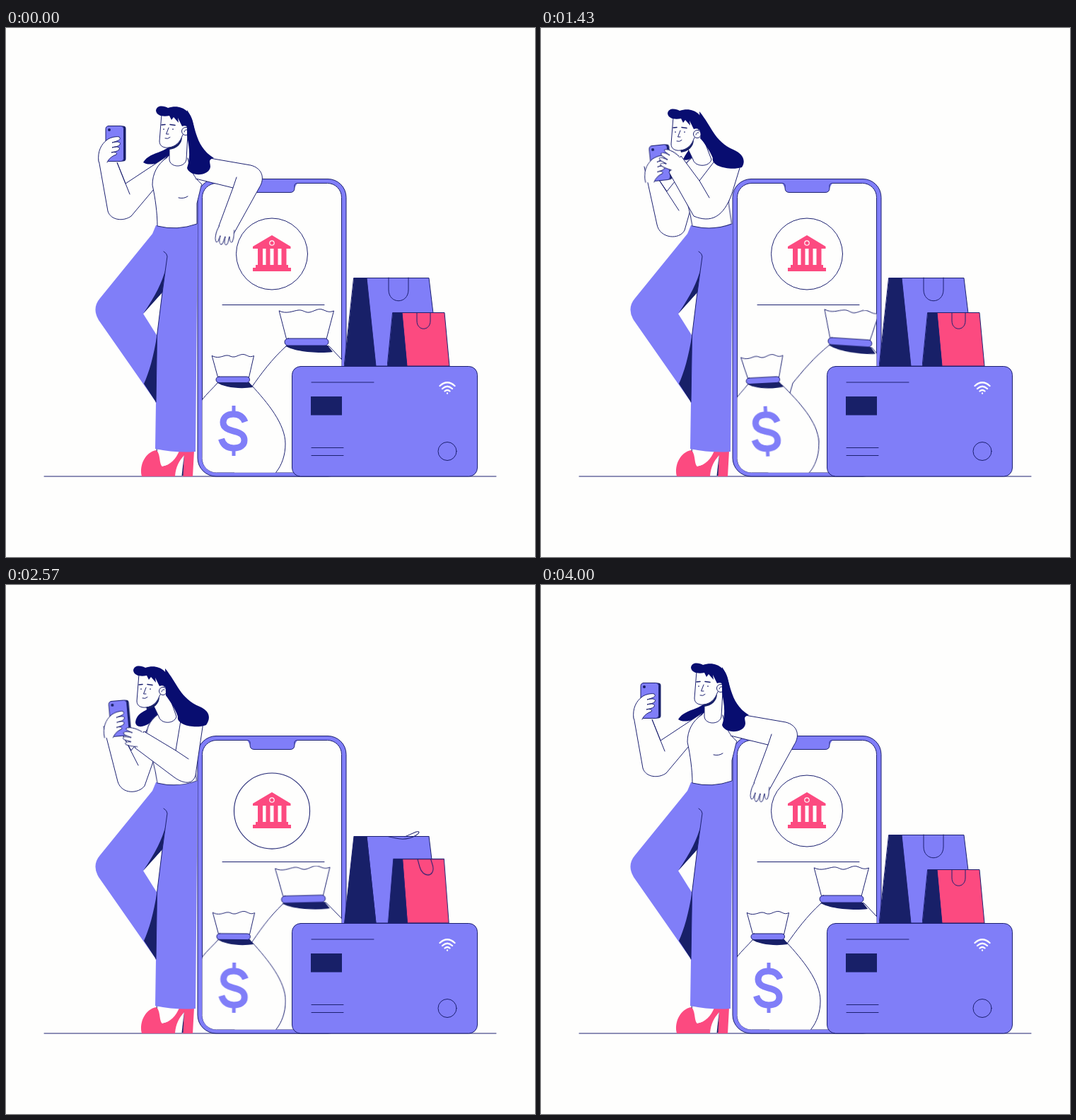
An HTML page without scripts for the animation above (4.03 s loop, 748 by 748 pixels).

```html
<!DOCTYPE html>
<html lang="en">
<head>
<meta charset="utf-8">
<title>Mobile banking</title>
<style>
html, body { margin: 0; height: 100%; overflow: hidden; background: #fefefd; }
svg { display: block; width: 100vw; height: 100vh; stroke-linejoin: round; stroke-linecap: round; }

.line { fill: none; stroke: #1c2170; }
.white { fill: #fefefd; stroke: #1c2170; }
.purple { fill: #807ef8; stroke: #1c2170; }
.plain { fill: #807ef8; }
.pink { fill: #fc4a80; }
.edge { stroke: #1c2170; }
.shade { fill: #182068; }
.hair { fill: #080d70; }

.move { animation: 4.03s cubic-bezier(.35, .15, .6, .9) infinite; }

/* Woman */
#head { animation-name: head; }
@keyframes head {
  0%, 84%, 100% { transform: none; }
  15.6%, 20% { transform: translate(3px, 0); }
  32%, 36% { transform: translate(-33px, 4px); }
  47.9% { transform: translate(-18px, 2px); }
  63.8% { transform: translate(-32px, 4px); }
  72.7% { transform: translate(-16px, 2px); }
}
#torso { animation-name: torso; transform-origin: 240px 280px; }
@keyframes torso {
  0%, 84%, 100% { transform: skewX(0deg); }
  15.6%, 20% { transform: skewX(-2.5deg); }
  32%, 36% { transform: skewX(8.2deg); }
  47.9% { transform: skewX(3.2deg); }
  63.8% { transform: skewX(7.8deg); }
  72.7% { transform: skewX(3.2deg); }
}
#neck { animation-name: neck; }
@keyframes neck {
  0%, 84%, 100% { d: path("M231,160 L231,186 C232,198 253,198 255,186 L257,150"); }
  15.6%, 20% { d: path("M234,160 L235,186 C236,198 257,198 260,186 L260,150"); }
  32%, 36% { d: path("M205,165 L215,186 C218,197 238,197 241,186 L228,152"); }
  47.9% { d: path("M217,162 L224,186 C227,198 248,197 250,186 L241,150"); }
  63.8% { d: path("M206,165 L216,186 C219,197 238,197 241,186 L229,152"); }
  72.7% { d: path("M217,162 L224,186 C227,198 247,197 249,186 L242,150"); }
}
#hairBack { animation-name: hairBack; }
@keyframes hairBack {
  0%, 84%, 100% { d: path("M245,150 C232,180 205,172 194,190 C200,195 220,193 230,181 L248,170 Z"); }
  15.6%, 20% { d: path("M245,152 C232,178 206,176 199,190 C200,212 222,204 232,182 L248,170 Z"); }
  32%, 36% { d: path("M212,155 C214,172 205,175 201,186 C206,188 212,186 216,180 L222,170 Z"); }
  47.9% { d: path("M226,152 C222,175 206,176 203,187 C208,191 216,187 222,181 L232,168 Z"); }
  63.8% { d: path("M214,155 C208,182 186,174 183,194 C184,206 206,200 216,180 L222,170 Z"); }
  72.7% { d: path("M226,152 C220,178 196,172 191,196 C195,205 218,192 226,180 L236,168 Z"); }
}
#hairFront { animation-name: hairFront; }
@keyframes hairFront {
  0%, 84%, 100% { d: path("M256,116 C270,135 264,165 294,184 C285,186 289,190 289,196 C288,210 260,211 256,198 C262,180 258,165 256,152 Z"); }
  15.6%, 20% { d: path("M258,116 C274,135 270,165 298,178 C308,186 308,203 296,206 C278,212 262,205 262,192 C264,180 260,165 259,152 Z"); }
  32%, 36% { d: path("M224,118 C242,140 245,160 272,172 C286,178 290,188 284,197 C268,202 240,196 243,184 C238,172 232,165 226,156 Z"); }
  47.9% { d: path("M238,117 C256,138 258,162 282,174 C296,182 297,190 291,203 C272,206 248,200 250,186 C250,175 244,165 239,154 Z"); }
  63.8% { d: path("M225,118 C243,140 246,160 274,172 C288,178 290,188 283,198 C268,204 240,198 243,186 C238,172 232,165 226,156 Z"); }
  72.7% { d: path("M240,117 C254,136 250,165 295,186 C285,186 286,190 287,196 C282,207 254,206 250,196 C254,180 246,165 240,154 Z"); }
}
#armFar { animation-name: armFar; }
@keyframes armFar {
  0%, 84%, 100% { d: path("M228,181 L169,220 L157,190 L175,235 M131,186 L144,259 C148,272 166,274 177,266 L209,228"); }
  15.6%, 20% { d: path("M228,183 L188,228 L170,203 L188,236 M141,193 L168,268 C174,288 198,288 208,274 L215,255"); }
  32%, 36% { d: path("M214,186 L178,231 L165,212 L195,258 M146,196 L164,278 C168,298 196,300 203,286 L211,258"); }
  47.9% { d: path("M222,186 L182,228 L174,206 L192,252 M148,196 L160,272 C166,292 188,292 200,280 L212,250"); }
  63.8% { d: path("M214,186 L177,234 L165,212 L187,255 M138,200 L158,278 C164,297 188,295 196,284 L208,250"); }
  72.7% { d: path("M224,184 L173,227 L161,204 L182,247 M136,190 L151,264 C155,284 176,288 190,274 L208,240"); }
}
#handFar { animation-name: handFar; transform-origin: 155px 163px; }
@keyframes handFar {
  0%, 84%, 100% { transform: translate(0, 0) rotate(0deg); }
  15.6%, 20% { transform: translate(5px, 15px) rotate(-28deg); }
  32%, 36% { transform: translate(14px, 27px) rotate(-6deg); }
  47.9% { transform: translate(18px, 17px) rotate(0deg); }
  63.8% { transform: translate(6px, 25px) rotate(-5deg); }
  72.7% { transform: translate(5px, 13px) rotate(-1deg); }
}
#armNear { animation-name: armNear; }
@keyframes armNear {
  0%, 84%, 100% { d: path("M288,184 L346,194 C362,198 367,212 358,226 L322,291 L301,280 L321,226 L268,213"); }
  15.6%, 20% { d: path("M297,205 L299,262 C300,290 285,292 272,286 L200,252 L212,229 L262,243 L264,193"); }
  32%, 36% { d: path("M281,198 L270,234 C258,268 240,276 216,266 L181,204 L198,181 L224,216 L247,186"); }
  47.9% { d: path("M290,204 L266,246 C252,274 232,278 212,262 L180,200 L200,180 L230,218 L254,190"); }
  63.8% { d: path("M279,194 L269,262 C268,284 252,282 238,272 L182,230 L195,207 L240,234 L247,192"); }
  72.7% { d: path("M294,186 L338,208 C354,214 358,228 346,240 L289,296 L272,280 L306,236 L260,208"); }
}
#crease { animation-name: crease; }
@keyframes crease {
  0%, 84%, 100% { d: path("M321,226 L326,211"); }
  15.6%, 20% { d: path("M262,243 L282,249"); }
  32%, 36% { d: path("M224,216 L238,240"); }
  47.9% { d: path("M230,218 L244,242"); }
  63.8% { d: path("M240,234 L258,246"); }
  72.7% { d: path("M306,236 L288,226"); }
}
#handNear { animation-name: handNear; }
@keyframes handNear {
  0%, 84%, 100% { transform: translate(312px, 284px) rotate(10deg); }
  15.6%, 20% { transform: translate(207px, 240px) rotate(105deg); }
  32%, 36% { transform: translate(189px, 191px) rotate(115deg); }
  47.9% { transform: translate(190px, 189px) rotate(108deg); }
  63.8% { transform: translate(188px, 218px) rotate(102deg); }
  72.7% { transform: translate(280px, 287px) rotate(32deg); }
}

/* Money and bank */
#sackBig { animation-name: sackBig; transform-origin: 425px 628px; }
@keyframes sackBig {
  0%, 80%, 100% { transform: rotate(0deg); }
  15.6% { transform: rotate(-1.5deg); }
  35.5% { transform: rotate(3.7deg); }
  47.9% { transform: rotate(1.7deg); }
  63.8% { transform: rotate(-1.4deg); }
  72.7% { transform: rotate(-.1deg); }
}
#sackSmall { animation-name: sackSmall; transform-origin: 335px 628px; }
@keyframes sackSmall {
  0%, 72.7%, 100% { transform: rotate(0deg); }
  15.6% { transform: rotate(-.3deg); }
  35.5% { transform: rotate(-3deg); }
  47.9%, 63.8% { transform: rotate(.4deg); }
}
#ring { animation-name: ring; transform-origin: 376px 319.5px; }
@keyframes ring {
  0%, 56%, 71%, 100% { transform: none; }
  63.8% { transform: scale(1.06); }
}
#bank { animation-name: bank; transform-origin: 376px 319.5px; }
@keyframes bank {
  0%, 66%, 79%, 100% { transform: none; }
  72.7% { transform: scale(1.035); }
}

/* Shopping bags */
#bagBig { animation-name: bagBig; transform-origin: 545px 478px; }
@keyframes bagBig {
  0%, 40%, 71%, 100% { transform: none; }
  47.9% { transform: scale(1.05, .935); }
  63.8% { transform: scale(1, .985); }
}
#loopBig { animation-name: loopBig; }
@keyframes loopBig {
  0%, 40%, 84%, 100% { d: path("M541,353 L541,370 C541,391 569,391 569,370 L569,353"); }
  47.9% { d: path("M545,353 L538,372 C532,390 557,395 562,378 L569,353"); }
  63.8% { d: path("M541,354 L550,356 C575,362 592,344 580,347 L564,354"); }
  72.7% { d: path("M545,353 L539,366 C535,385 560,388 564,370 L570,353"); }
}
#bagSmall { animation-name: bagSmall; transform-origin: 583px 478px; }
@keyframes bagSmall {
  0%, 53%, 84%, 100% { transform: none; }
  63.8%, 72.7% { transform: scale(.98, 1.2); }
}
#loopSmall { animation-name: loopSmall; }
@keyframes loopSmall {
  0%, 53%, 90%, 100% { d: path("M581,403 L581,414 C581,429 600,429 600,414 L600,403"); }
  63.8% { d: path("M582,403 L585,412 C589,425 607,424 604,411 L601,403"); }
  72.7% { d: path("M580,404 L590,402 C602,403 616,391 608,394 L598,402"); }
}
</style>
</head>
<body>
<svg viewBox="0 0 748 748" aria-label="Woman with a phone beside a banking app">
  <defs>
    <clipPath id="screen"><rect x="277.5" y="219.5" width="197" height="409" rx="20"/></clipPath>
  </defs>
  <path class="line" d="M54,634 H693"/>

  <!-- Phone -->
  <rect class="purple" x="271" y="213.5" width="210" height="420.5" rx="26"/>
  <rect class="white" x="277.5" y="219.5" width="197" height="409" rx="20"/>
  <path class="plain" d="M340,218 H413 L408,226 Q408,232.500 402,232.500 H351 Q345,232.500 345,226 Z"/>
  <path class="line" d="M341,219.500 Q345,219.500 345,223 V226 Q345,232.500 351,232.500 H402 Q408,232.500 408,226 V223 Q408,219.500 412,219.500"/>
  <circle id="ring" class="move white" cx="376" cy="319.500" r="50.500"/>
  <g id="bank" class="move pink">
    <path d="M376,293 L402.500,309 V312 H349 V309 Z"/>
    <path d="M356,311 h7 v25 h-7z m11.500,0 h6 v25 h-6z m11,0 h6 v25 h-6z m11,0 h7 v25 h-7z"/>
    <path d="M353,335 H399 V339 H403 V344 H349 V339 H353 Z"/>
    <circle cx="376" cy="304" r="3.200" fill="none" stroke="#fefefd" stroke-width="1.200"/>
  </g>
  <path class="line" d="M306,391.500 H450"/>

  <g clip-path="url(#screen)">
    <g id="sackBig" class="move">
      <path class="white" d="M396,450 C376,468 360,490 348,507 L320,640 H560 V560 L474,468 L457,450 Z"/>
      <path class="shade" d="M395,449 C404,457 440,461 462,458 L455,449 Z"/>
      <path class="white" d="M386.500,400 C396,405 406,400 413,399 S423,403 429,402 S441,396 447,398 S456,403 463.500,400 L453,440 H397 Z"/>
      <rect class="purple" x="394" y="439" width="62" height="10" rx="5"/>
    </g>
    <g id="sackSmall" class="move">
      <path class="white" d="M299,502 C292,510 284,517 277,526 L262,560 V640 H370 L382,628 C390,618 395,604 395,588 C395,560 370,530 347,505 Z"/>
      <path class="shade" d="M298,501 C307,508 330,511 349,508 L344,501 Z"/>
      <path class="white" d="M291.500,463.500 C299,468 306,464 311,463 S318,466 323,465 S333,460 338,462 S345,466 350.500,463.500 L343.500,494 H300 Z"/>
      <rect class="purple" x="297" y="493" width="47.500" height="8.500" rx="4.200"/>
      <g fill="none" stroke="#807ef8" stroke-linecap="butt">
        <path stroke-width="9" d="M338,557 C335,549 329,546 321.500,546 C312,546 307,551 307,557.500 C307,566 315,568 322,570 C331,572 337,575 337,583 C337,590 331,594 322,594 C313,594 307,590 304.500,581"/>
        <path stroke-width="5" d="M322,534 V546 M322,594 V605"/>
      </g>
    </g>
  </g>

  <!-- Shopping bags -->
  <g id="bagBig" class="move">
    <path class="purple" d="M510,353.500 H598 L613,478 H523 Z"/>
    <path class="shade edge" d="M492,353.500 H510 L523,478 H478.500 Z"/>
    <path id="loopBig" class="move line"/>
  </g>
  <g id="bagSmall" class="move">
    <path class="pink edge" d="M560,402.500 H620 L627,478 H567 Z"/>
    <path class="shade edge" d="M547,402.500 H560 L567,478 H539.500 Z"/>
    <path id="loopSmall" class="move line"/>
  </g>

  <!-- Card -->
  <rect class="purple" x="404.500" y="478.500" width="262" height="155.500" rx="12"/>
  <path class="line" d="M432,501 H520 M432,593.500 H477 M432,604.500 H477"/>
  <rect class="shade" x="431" y="521" width="44" height="26.500"/>
  <circle class="purple" cx="624" cy="598.500" r="13"/>
  <g fill="none" stroke="#fefefd" stroke-width="2.300">
    <path d="M613.500,506 Q624,496.500 634.500,506 M617,510 Q624,503.500 631,510 M620.500,513.500 Q624,510.500 627.500,513.500"/>
    <path d="M624,516.500 v.2"/>
  </g>

  <!-- Legs and shoes -->
  <path class="white" d="M213,595 L217,622 L238,616 L247,598 Z"/>
  <path class="pink" d="M192,634 C188,618 197,600 212,597 C219,601 216,616 221,620 C232,618 240,610 245,598 H266 L264,634 H250 L252,604 C245,612 240,620 239,634 Z"/>
  <path class="shade" d="M252,602 L248.500,633 H250.500 Z"/>
  <path class="plain" d="M212,279 L207,291 L133,382 Q121,396 131,413 L212,529 L211,595 Q240,601 268,599 L271,277 Z"/>
  <path fill="#fefefd" d="M194,404 L221,373 L213.500,435 Z"/>
  <path class="shade" d="M225,343 C221,358 212,378 194,404 L221,374 Z M213.500,434 C209,464 202,488 195,503 L212,529 Z"/>
  <path class="line" d="M223,316 Q228,319 228,323 L221,374 L213.500,435 L212,529"/>

  <!-- Upper body -->
  <path id="hairBack" class="move hair"/>
  <path id="armFar" class="move white"/>
  <g id="torso" class="move">
    <path class="white" d="M228,183 C214,192 207,206 207,222 C211,240 214,262 214,280 Q242,287 270,277 L270,248 C274,232 276,222 277,221 C266,212 260,200 257,184"/>
    <path class="line" d="M244,240 Q251,242 257,238"/>
  </g>
  <path id="neck" class="move white"/>

  <g id="head" class="move">
    <path class="shade" d="M230,168 C240,168 246,161 249,154 C249,164 241,171 231,172 Z"/>
    <path class="white" d="M220,122 L217,160 C217,167 223,170 230,169 C240,168 246,161 249,153 L256,140 L250,118"/>
    <circle class="white" cx="254" cy="146" r="5.500"/>
    <path class="line" d="M230,141 L226.500,150 H230 M225,156 Q229,157.500 232,154.500 M252,147 Q253,143 256,144"/>
    <path class="line" stroke-width="1.600" d="M220,137 L225,136.500 M232,136.500 L239,137.500 M223,143 v.3 M236,143 v.3"/>
    <path class="hair" d="M212,117 C213,108 224,110 229,113 C246,107 262,116 265,136 C267,146 268,156 270,164 L258,152 C261,142 256,136 249,139 L243,127 L244,134 L237,126 L234,130 L231,124 C222,126 213,124 212,117 Z"/>
  </g>

  <g id="handFar" class="move">
    <rect class="shade" x="143" y="138.500" width="26.500" height="50" rx="4"/>
    <rect class="purple" x="141" y="138.500" width="25.500" height="50" rx="4"/>
    <circle class="shade" cx="146" cy="144" r="2"/>
    <path class="white" d="M131,189 C129,174 135,164 143,158 C148,154 158,153 160,154 C163,157 161,159 150,162 C158,160 163,161 161,165 C158,168 154,168 150,169 C156,167 162,168 160,172 C157,175 152,175 149,176 C154,175 158,176 156,179 C150,181 145,185 143,190"/>
  </g>

  <path id="armNear" class="move white"/>
  <path id="crease" class="move line"/>
  <g id="handNear" class="move">
    <rect fill="#fefefd" x="-10" y="-5" width="20.500" height="11"/>
    <path class="white" d="M-11,-2 C-15,8 -14,19 -11,21 C-8,21 -8,14 -7,11 C-8,19 -6,24 -3,23 C-1,21 -1,14 0,11 C0,19 1,24 4,22 C6,20 5,14 6,10 C7,16 9,19 11,17 C13,10 11,5 11,0"/>
  </g>
  <path id="hairFront" class="move hair"/>
</svg>
</body>
</html>
```
